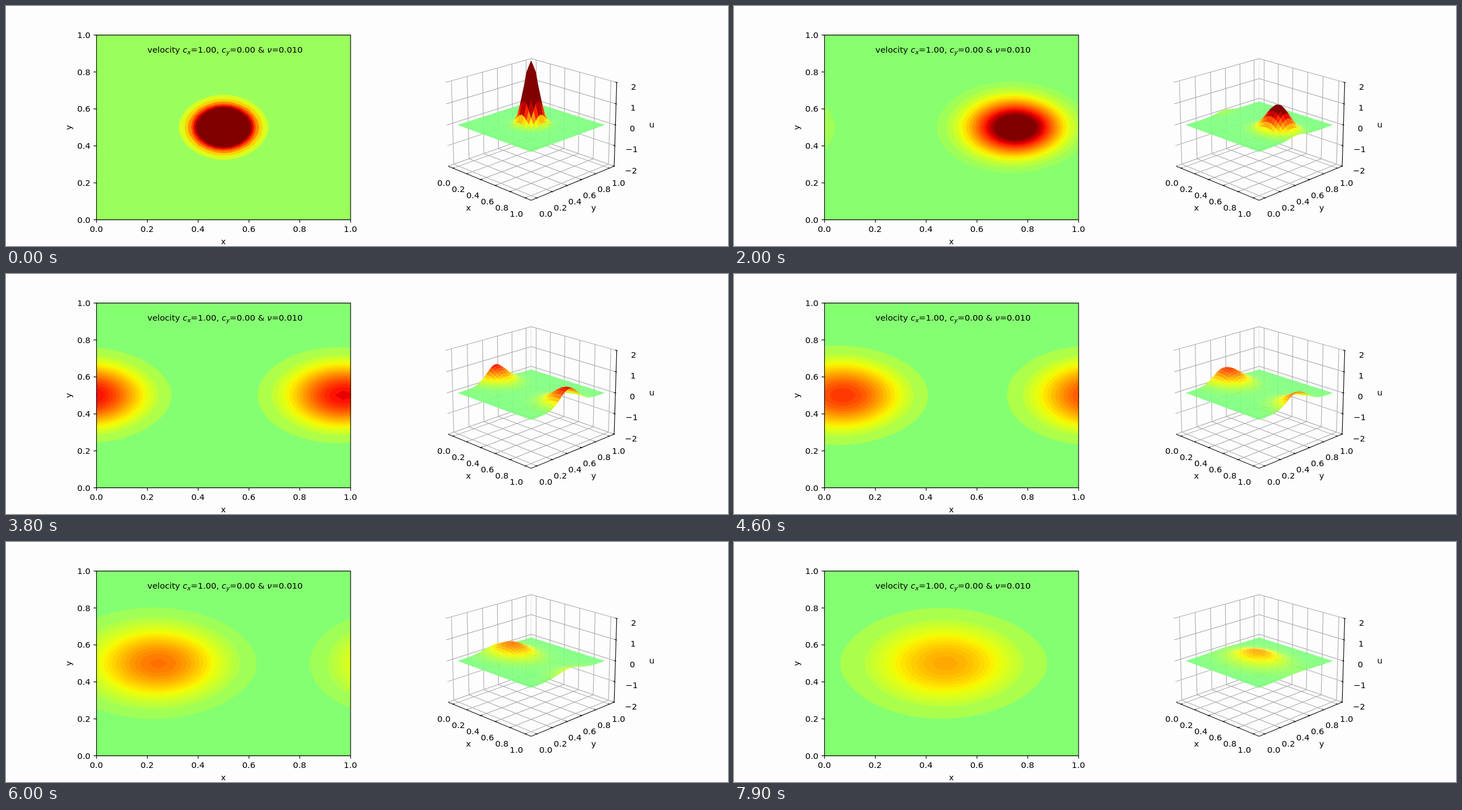
Write an HTML page with a canvas that moves like this. It is 1280 by 427 pixels and loops after 8000 ms.

```html
<!DOCTYPE html>
<html lang="en">
<head>
<meta charset="utf-8">
<title>Advection and diffusion</title>
<style>
  html, body { margin: 0; width: 100%; height: 100%; overflow: hidden; background: #fdfdfd; }
  canvas, svg { position: absolute; left: 0; top: 0; width: 1280px; height: 427px; }
  text { font: 14.8px "DejaVu Sans", sans-serif; white-space: pre; }
  .m { font-style: italic; }
  .s { font-style: italic; font-size: 10.4px; }
  path { fill: none; stroke: #000; stroke-width: 1.15; }
</style>
</head>
<body>
<canvas id="plot" width="1280" height="427"></canvas>
<svg id="axes" viewBox="0 0 1280 427">
  <text x="250.7" y="83">velocity <tspan class="m">c</tspan><tspan class="s" dy="2.6">x</tspan><tspan dy="-2.6">=1.00, </tspan><tspan class="m">c</tspan><tspan class="s" dy="2.6">y</tspan><tspan dy="-2.6">=0.00 &amp; </tspan><tspan class="m">ν</tspan>=0.010</text>
</svg>
<script>
const STEPS = 80, STEP_MS = 100;
const N = 32, DX = 1 / N, CX = 1, NU = 0.01, DT = DX * DX / (8 * NU);
const ctx = document.getElementById('plot').getContext('2d');
const axes = document.getElementById('axes');

// ---- field: upwind advection with explicit diffusion on a periodic grid
const at = (u, i, j) => u[((j + N) % N) * N + (i + N) % N];

function simulate() {
  const c = CX * DT / DX, r = NU * DT / (DX * DX);
  let u = Float64Array.from({ length: N * N }, (_, k) => {
    const x = (k % N) * DX - 0.5, y = Math.floor(k / N) * DX - 0.5;
    return 3 * Math.exp(-100 * (x * x + y * y));
  });
  const all = [u];
  while (all.length < STEPS) {
    const p = u;
    u = p.map((v, k) => {
      const i = k % N, j = Math.floor(k / N), left = at(p, i - 1, j);
      const sum = left + at(p, i + 1, j) + at(p, i, j - 1) + at(p, i, j + 1);
      return v - c * (v - left) + r * (sum - 4 * v);
    });
    all.push(u);
  }
  return all;
}

// ---- colour scale for values from -1 to 1
const clamp = v => Math.max(0, Math.min(1, v));

function jet(u) {
  const v = clamp((u + 1) / 2);
  const r = v > 0.89 ? 1 - (v - 0.89) / 0.22 : clamp((v - 0.35) / 0.31);
  const g = v < 0.5 ? clamp((v - 0.125) / 0.25) : clamp((0.91 - v) / 0.27);
  const b = clamp((0.65 - v) / 0.31);
  return `rgb(${[r, g, b].map(n => Math.round(n * 255))})`;
}

// ---- filled contours
const BOX = { x: 160.2, y: 51.3, w: 450.9, h: 328.9 };

function levelStep(max) {
  const raw = max / 20.8, mag = 10 ** Math.floor(Math.log10(raw));
  return mag * [1, 1.5, 2, 2.5, 3, 4, 5, 6, 8, 10].find(s => s * mag >= raw);
}

// Bands as [lower level, colour value]; fine low bands share a colour.
function bands(max) {
  const d = levelStep(max), group = d < 0.045 ? Math.floor(0.08 / d + 1e-6) : 1;
  const list = [[0, Math.max(d / 2, 0.023)], [group * d, 1.5 * group * d]];
  for (let k = 2 * group; k * d < max; k++) list.push([k * d, (k + 0.5) * d]);
  return list;
}

function cellPath(u, i, j, level) {
  const pts = [[i, j], [i + 1, j], [i + 1, j + 1], [i, j + 1]];
  const val = pts.map(p => at(u, p[0], p[1]));
  const out = [];
  for (let a = 0; a < 4; a++) {
    const b = (a + 1) % 4;
    if (val[a] >= level) out.push(pts[a]);
    if (val[a] >= level !== val[b] >= level) {
      const f = (level - val[a]) / (val[b] - val[a]);
      out.push([0, 1].map(n => pts[a][n] + f * (pts[b][n] - pts[a][n])));
    }
  }
  out.forEach(([x, y], n) => {
    const px = BOX.x + x * DX * BOX.w, py = BOX.y + (1 - y * DX) * BOX.h;
    n ? ctx.lineTo(px, py) : ctx.moveTo(px, py);
  });
  if (out.length) ctx.closePath();
}

function drawContours(u) {
  for (const [level, value] of bands(Math.max(...u))) {
    ctx.fillStyle = jet(value);
    ctx.beginPath();
    if (level === 0) ctx.rect(BOX.x, BOX.y, BOX.w, BOX.h);
    else for (let j = 0; j < N; j++) for (let i = 0; i < N; i++) cellPath(u, i, j, level);
    ctx.fill();
  }
}

// ---- perspective view
const LO = -0.0729, HI = 1.0729;
const ELEV = Math.PI / 9, SIN = Math.sin(ELEV), COS = Math.cos(ELEV);

function project(x, y, z) {
  const k = 1.1905 / (HI - LO) / Math.SQRT2;
  const side = (x + y - 1) * k, near = (x - y) * k, up = z * 0.2232;
  const f = 1775 / (10 - near * COS - up * SIN);
  return [931 + side * f, 211.6 - (up * COS - near * SIN) * f];
}

function poly(...pts) {
  ctx.beginPath();
  pts.forEach(p => ctx.lineTo(...project(...p)));
}

function drawGrid() {
  const line = (...pts) => { poly(...pts); ctx.stroke(); };
  ctx.lineWidth = 1.2;
  ctx.strokeStyle = '#e6e6e6';
  line([LO, HI, -2], [LO, HI, 2]);
  ctx.strokeStyle = '#b0b0b0';
  for (let k = 0; k <= 5; k++) {
    const t = k / 5;
    line([t, LO, -2], [t, HI, -2], [t, HI, 2]);
    line([HI, t, -2], [LO, t, -2], [LO, t, 2]);
  }
  for (let z = -2; z <= 2; z++) line([LO, LO, z], [LO, HI, z], [HI, HI, z]);
}

const cells = Array.from({ length: N * N }, (_, k) => [k % N, Math.floor(k / N)])
  .sort((a, b) => (a[0] - a[1]) - (b[0] - b[1]));

function drawSurface(u) {
  for (const [i, j] of cells) {
    const quad = [[i, j], [i + 1, j], [i + 1, j + 1], [i, j + 1]]
      .map(([a, b]) => [a * DX, b * DX, at(u, a, b)]);
    ctx.fillStyle = jet(quad.reduce((s, p) => s + p[2], 0) / 4);
    poly(...quad);
    ctx.fill();
  }
}

// ---- axes and labels
function add(tag, attrs, text = '') {
  const el = document.createElementNS('http://www.w3.org/2000/svg', tag);
  for (const key in attrs) el.setAttribute(key, attrs[key]);
  el.textContent = text;
  axes.appendChild(el);
}
const label = (text, x, y, anchor = 'middle', extra = {}) =>
  add('text', { x, y, 'text-anchor': anchor, ...extra }, text);
const stroke = d => add('path', { d });
const line3 = (...pts) => stroke('M' + pts.map(p => project(...p).map(n => n.toFixed(2))).join('L'));

function buildAxes() {
  stroke('M160.5 51.6H610.9V380.3H160.5Z');
  label('x', 385.5, 423.5);
  label('y', 0, 0, 'middle', { transform: 'translate(116 216)rotate(-90)' });
  const outer = 0.0096, inner = 0.0191;
  for (let k = 0; k <= 5; k++) {
    const t = k / 5, name = t.toFixed(1);
    const x = 160.5 + k * 90.08, y = 380.3 - k * 65.74;
    stroke(`M${x} 380.3v5.2M160.5 ${y}h-5.2`);
    label(name, x - 0.3, 402.3);
    label(name, 149.8, y + 5.4, 'end');
    line3([t, LO - outer, -2], [t, LO + inner, -2]);
    line3([HI + outer, t, -2], [HI - inner, t, -2]);
    label(name, 776.3 + k * 25.7, 320.3 + k * 11);
    label(name, 957 + k * 25.8, 375.3 - k * 11);
  }
  line3([LO, LO, -2], [HI, LO, -2], [HI, HI, -2], [HI, HI, 2]);
  for (let z = -2; z <= 2; z++) {
    line3([HI - inner, HI, z], [HI + outer, HI, z]);
    label(String(z).replace('-', '−'), 1110.4 + z * 1.2, 223.1 - z * 37.2);
  }
  label('x', 820, 363.5);
  label('y', 1042, 363.5);
  label('u', 1145, 215.5);
}

// ---- playback
const fields = simulate();
let shown = -1;

function draw(now) {
  const step = Math.floor(now / STEP_MS) % STEPS;
  if (step !== shown) {
    shown = step;
    ctx.fillStyle = '#fdfdfd';
    ctx.fillRect(0, 0, 1280, 427);
    drawContours(fields[step]);
    drawGrid();
    drawSurface(fields[step]);
  }
}

function tick() {
  draw(performance.now() - start);
  requestAnimationFrame(tick);
}

buildAxes();
const start = performance.now();
tick();
</script>
</body>
</html>
```
